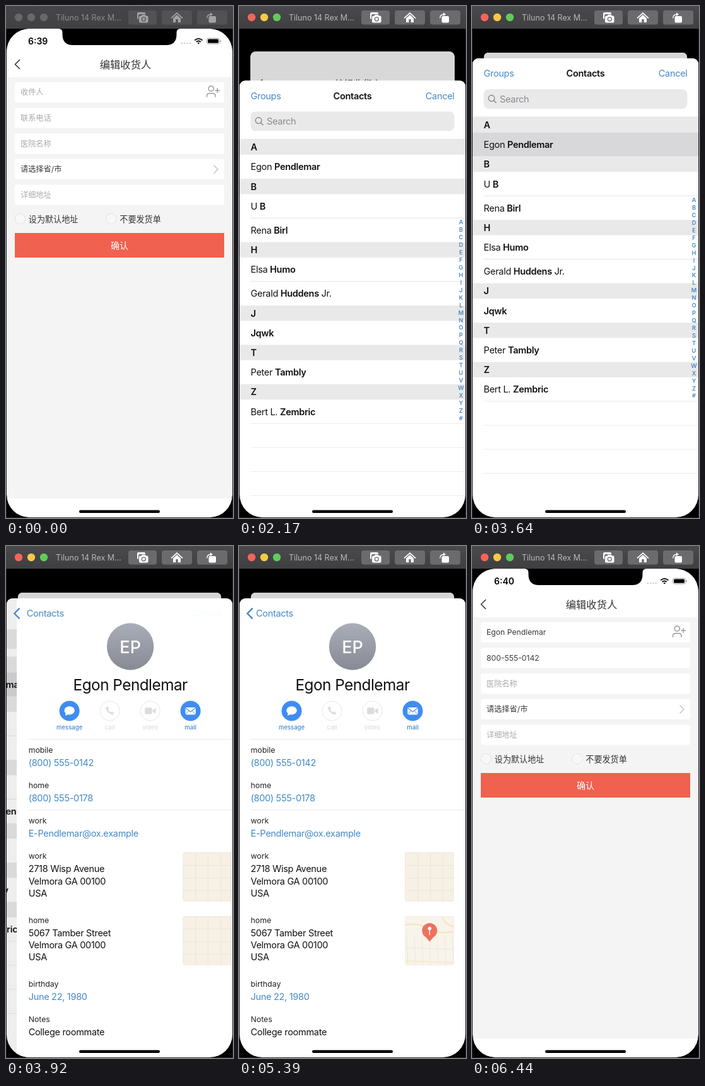
Recreate the animation shown at these times as an HTML page with a canvas. Size 360 by 812 pixels, loop 8050 ms.

```html
<!DOCTYPE html>
<html lang="zh">
<head>
<meta charset="utf-8">
<title>编辑收货人</title>
<style>
html, body { margin: 0; width: 100%; height: 100%; overflow: hidden; background: #000; }
canvas { display: block; width: 360px; height: 812px; }
</style>
</head>
<body>
<canvas id="stage"></canvas>
<script>
const W = 360, H = 812, LOOP = 8050, STEP = 70;
const LINK = '#4489c6', BLUE = '#3f8df2', INK = '#111', HAIR = '#e4e4e4';
const SHEET_TOP = 83;
const T = { active: 1680, release: 1820, present: 1908, tapRow: 3630, push: 3657,
            maps: 4270, tapPhone: 4830, dismiss: 5410 };
const PERSON = 'Egon Pendlemar', PHONE = '800-555-0142';

const canvas = document.getElementById('stage');
const ratio = window.devicePixelRatio || 1;
canvas.width = W * ratio;
canvas.height = H * ratio;
const c = canvas.getContext('2d');

const clamp = v => Math.max(0, Math.min(1, v));
const mix = (a, b, p) => a + (b - a) * p;

// Critically damped spring, from 0 to 1
function spring(ms) {
  const x = Math.max(0, ms) / 1000 * 18.26;
  return 1 - (1 + x) * Math.exp(-x);
}

function group(draw) {
  c.save();
  draw();
  c.restore();
}

// y is the middle of the capitals
function text(s, x, y, size, { color = INK, weight = 400, align = 'left', gap = 0 } = {}) {
  c.font = `${weight} ${size}px Inter, "Noto Sans CJK SC", "Noto Sans CJK", sans-serif`;
  c.letterSpacing = gap + 'px';
  c.textAlign = align;
  c.fillStyle = color;
  c.fillText(s, x, y + size * 0.364);
  return c.measureText(s).width;
}

function body(s, x, y, opts) {
  return text(s, x, y, 14.5, { gap: -0.3, ...opts });
}

function rect(x, y, w, h, color) {
  c.fillStyle = color;
  c.fillRect(x, y, w, h);
}

function roundPath(x, y, w, h, r) {
  c.beginPath();
  c.roundRect(x, y, w, h, r);
}

function round(x, y, w, h, r, color) {
  roundPath(x, y, w, h, r);
  c.fillStyle = color;
  c.fill();
}

function disc(x, y, r, color) {
  c.beginPath();
  c.arc(x, y, r, 0, 7);
  c.fillStyle = color;
  c.fill();
}

function ring(x, y, r, color, width = 1) {
  c.beginPath();
  c.arc(x, y, r, 0, 7);
  pen(color, width);
}

function pen(color, width) {
  c.strokeStyle = color;
  c.lineWidth = width;
  c.stroke();
}

function line(points, color, width) {
  c.beginPath();
  points.forEach(([x, y]) => c.lineTo(x, y));
  pen(color, width);
}

function shape(d, color) {
  c.fillStyle = color;
  c.fill(new Path2D(d));
}

function curve(d, color, width) {
  c.strokeStyle = color;
  c.lineWidth = width;
  c.stroke(new Path2D(d));
}

function titleBar(active) {
  const bar = c.createLinearGradient(0, 0, 0, 36);
  bar.addColorStop(0, active ? '#4a494b' : '#464547');
  bar.addColorStop(1, active ? '#3f3e40' : '#414042');
  rect(0, 0, W, 36, bar);
  const lights = active ? ['#f9635a', '#f6c945', '#5fcb5b'] : ['#686769', '#686769', '#686769'];
  lights.forEach((color, i) => disc(20 + 20 * i, 18, 6.2, color));
  text('Tiluno 14 Rex M...', 79, 18.5, 12.5, { color: active ? '#b8b7b9' : '#8b8a8c' });

  const back = active ? '#6b6a6c' : '#525153', ink = active ? '#fff' : '#a3a2a4';
  [[194, 45], [247, 48], [303, 48]].forEach(([x, w]) => round(x, 7, w, 22.5, 4, back));

  round(208, 10, 13, 11, 2, ink);
  round(210, 13, 16.5, 14.5, 2.5, back);
  round(211, 15.5, 14.5, 11, 2, ink);
  round(215, 13.8, 6.5, 4, 1, ink);
  ring(218.3, 20.8, 3, back, 1.3);

  line([[262, 19.3], [271, 11.2], [280, 19.3]], ink, 1.8);
  shape('M265 19.5 L271 14 L277 19.5 V26 H272.7 V21 H269.3 V26 H265 Z', ink);

  round(321.5, 16, 11.5, 10.5, 2, ink);
  curve('M318.7 19.5 Q318.7 13.5 325 13.3', ink, 1.4);
  shape('M324 10.3 L328 13.2 L324 16 Z', ink);
}

function personIcon(alpha) {
  group(() => {
    c.globalAlpha *= alpha;
    c.lineCap = 'round';
    ring(325.3, 131, 4.1, '#999', 1.5);
    curve('M318.5 144 V142.5 Q318.5 138.5 323 138.5 H327.5 Q332 138.5 332 142.5 V144', '#999', 1.5);
    line([[332, 134], [338.5, 134]], '#999', 1.4);
    line([[335.2, 130.8], [335.2, 137.2]], '#999', 1.4);
  });
}

function form(filled, iconAlpha) {
  rect(0, 36, W, 776, '#f4f4f4');
  rect(0, 36, W, 77, '#fff');
  rect(0, 781, W, 31, '#fff');
  line([[22, 85], [14.5, 92.5], [22, 100]], '#333', 1.5);
  text('编辑收货人', 189.5, 93, 16.3, { color: '#333', weight: 500, align: 'center' });

  const dark = '#3a3a3a', pale = '#aaa';
  const rows = [
    filled ? [PERSON, dark] : ['收件人', pale],
    filled ? [PHONE, dark] : ['联系电话', pale],
    ['医院名称', pale], ['请选择省/市', dark], ['详细地址', pale]
  ];
  rows.forEach(([label, color], i) => {
    const y = 121 + 40.6 * i;
    round(14, y, 332, 32, 3, '#fff');
    text(label, 23, y + 16, 12.2, { color });
  });
  personIcon(iconAlpha);
  line([[329.5, 252.5], [336, 259], [329.5, 265.5]], '#bbb', 1.2);

  [[22.5, '设为默认地址'], [167, '不要发货单']].forEach(([x, label]) => {
    disc(x, 337.5, 8.3, '#f7f7f7');
    ring(x, 337.5, 8.3, '#e2e2e2');
    text(label, x + 13.3, 338, 13.1, { color: '#333' });
  });
  rect(14, 360, 332, 39, '#f0614f');
  text('确认', 180, 380, 14, { color: '#fff', align: 'center' });
}

function statusBar(clock) {
  text(clock, 35, 56, 14, { weight: 600, color: '#000' });
  for (let i = 0; i < 4; i++) disc(278.7 + 4.3 * i, 59, 1.3, '#ccc');
  group(() => {
    c.beginPath();
    c.moveTo(305.3, 60.5);
    c.arc(305.3, 60.5, 10, -Math.PI * 0.75, -Math.PI * 0.25);
    c.clip();
    disc(305.3, 60.5, 2.6, '#000');
    ring(305.3, 60.5, 5, '#000', 1.9);
    ring(305.3, 60.5, 8.6, '#000', 1.9);
  });
  roundPath(318.5, 51.2, 20, 9, 2.6);
  pen('#999', 0.9);
  round(320, 52.6, 17, 6.2, 1.5, '#000');
  round(339.6, 54, 1.3, 3.4, 0.6, '#999');
}

function person(parts, y) {
  let x = 18.5;
  parts.forEach((part, i) => { x += body(part, x, y, { weight: i === 1 ? 600 : 400 }); });
}

const CONTACTS = [
  ['A', [['Egon ', 'Pendlemar']]],
  ['B', [['U ', 'B'], ['Rena ', 'Birl']]],
  ['H', [['Elsa ', 'Humo'], ['Gerald ', 'Huddens', ' Jr.']]],
  ['J', [['', 'Jqwk']]],
  ['T', [['Peter ', 'Tambly']]],
  ['Z', [['Bert L. ', 'Zembric']]]
];
const HEAD = 24.3, ROW = 38.1;

function list(pressed) {
  rect(0, SHEET_TOP, W, 730, '#fff');
  round(18.5, 132, 323, 31, 8, '#e9e9ea');
  ring(31, 146.3, 4.8, '#85858a', 1.3);
  line([[34.5, 149.8], [38.5, 153.8]], '#85858a', 1.5);
  body('Search', 44, 147.5, { color: '#8a8a8e' });
  rect(0, 175.7, W, 0.8, '#d6d6d6');

  let y = 176.3;
  for (const [letter, people] of CONTACTS) {
    rect(0, y, W, HEAD, '#e9e9e9');
    body(letter, 18.5, y + HEAD / 2 + 0.3, { weight: 600 });
    y += HEAD;
    people.forEach((parts, i) => {
      if (pressed && letter === 'A') rect(0, y, W, ROW, '#d8d8da');
      if (i) rect(18.5, y - 0.5, W, 1, HAIR);
      person(parts, y + ROW / 2 + 0.3);
      y += ROW;
    });
  }
  for (let i = 0; i < 4; i++) rect(18.5, y - 0.5 + ROW * i, W, 1, '#ebebeb');
  [...'ABCDEFGHIJKLMNOPQRSTUVWXYZ#'].forEach((ch, i) =>
    text(ch, 352, 307.7 + 11.94 * i, 9.2, { color: LINK, weight: 600, align: 'center' }));
}

function mapTile(y, loaded, pin) {
  group(() => {
    roundPath(263.5, y, 77.5, 77.5, 3);
    c.clip();
    rect(263, y, 79, 79, loaded && pin ? '#f8f4ec' : '#f6f0e5');
    if (loaded && pin) {
      for (let i = 0; i < 7; i++) line([[266 + 12 * i, y + 31], [268 + 12 * i, y + 78]], '#ebe5da', 0.8);
      line([[263, y + 50], [342, y + 53]], '#ece6da', 1);
      curve(`M263 ${y + 14} Q285 ${y + 10} 300 ${y + 20} T342 ${y + 24}`, '#f4e6b4', 2);
      curve(`M322 ${y} Q326 ${y + 14} 342 ${y + 17}`, '#f4e6b4', 2);
      line([[263, y + 71], [342, y + 74]], '#f4e9c3', 1.5);
      shape(`M296 ${y + 33} L302.3 ${y + 40.5} L308.6 ${y + 33} Z`, '#f0705f');
      disc(302.3, y + 23, 12, '#f0705f');
      disc(302.3, y + 19.5, 2.8, '#fff');
      rect(301.7, y + 21, 1.3, 9, '#fff');
    } else {
      for (let i = 0; i < 4; i++) {
        rect(263 + 20 * i, y, 0.8, 78, '#ebe3d4');
        rect(263, y + 20 * i, 78, 0.8, '#ebe3d4');
      }
    }
    roundPath(263.5, y, 77.5, 77.5, 3);
    pen('#ece6da', 1);
  });
}

function actions() {
  const off = '#dcdcdc';
  ['message', 'call', 'video', 'mail'].forEach((label, i) => {
    const x = 83.5 + 64 * i, on = i === 0 || i === 3;
    if (on) disc(x, 261.5, 16, BLUE);
    else ring(x, 261.5, 15.5, '#e6e6e6');
    text(label, x, 288, 9.5, { color: on ? LINK : off, weight: 500, align: 'center' });
  });
  c.beginPath();
  c.ellipse(83.5, 260.8, 8.3, 6.6, 0, 0, 7);
  c.fillStyle = '#fff';
  c.fill();
  shape('M78 264 L76.8 269.3 L83 266.5 Z', '#fff');

  curve('M143 256.5 Q143.5 264.5 152 266', off, 2.6);
  line([[142.3, 255.5], [144.3, 259.5]], off, 4);
  line([[149.5, 264.3], [153, 266.3]], off, 4);

  round(203, 256.2, 11.5, 10.6, 2.3, off);
  shape('M215.5 260 L220.5 256.7 V266.3 L215.5 263 Z', off);

  round(267.3, 256, 16.4, 11.4, 1.8, '#fff');
  line([[267.8, 257], [275.5, 263], [283.2, 257]], BLUE, 1.2);
  line([[267.8, 266.5], [273, 261.5]], BLUE, 0.9);
  line([[283.2, 266.5], [278, 261.5]], BLUE, 0.9);
}

const FIELDS = [
  [324, 'mobile', LINK, '(800) 555-0142'],
  [380, 'home', LINK, '(800) 555-0178'],
  [436, 'work', LINK, 'E-Pendlemar@ox.example'],
  [492, 'work', INK, '2718 Wisp Avenue', 'Velmora GA 00100', 'USA'],
  [593.5, 'home', INK, '5067 Tamber Street', 'Velmora GA 00100', 'USA'],
  [694.5, 'birthday', LINK, 'June 22, 1980'],
  [750.5, 'Notes', INK, 'College roommate']
];

function detail(t) {
  rect(0, SHEET_TOP, W, 730, '#fff');
  const shade = c.createLinearGradient(0, 122, 0, 197);
  shade.addColorStop(0, '#aaaeb9');
  shade.addColorStop(1, '#878a93');
  disc(180, 159.5, 37.2, shade);
  text('EP', 180, 160.5, 27, { color: '#fff', weight: 500, align: 'center' });
  text(PERSON, 180, 220, 24.3, { align: 'center', gap: -0.5 });
  actions();

  const press = t < T.tapPhone ? 0 : 1 - clamp((t - T.tapPhone - 140) / 280);
  if (press) rect(0, 306, W, 56, `rgba(209,209,214,${0.5 * press})`);
  rect(18.5, 306, W, 0.8, HAIR);
  rect(18.5, 418, W, 0.8, HAIR);
  for (const [y, label, color, ...lines] of FIELDS) {
    text(label, 18.5, y, 12.3, { color: '#222' });
    lines.forEach((s, i) => body(s, 18.5, y + 20.2 + 19.1 * i, { color }));
  }
  const loaded = t >= T.maps;
  mapTile(486, loaded, false);
  mapTile(587, loaded, true);
}

function navBar(p) {
  group(() => {
    c.globalAlpha = 1 - p;
    body('Groups', 18.5, 107, { color: LINK });
    body('Cancel', 341.5, 107, { color: LINK, align: 'right' });
    body('Contacts', 180 - 122 * p, 107, { weight: 600, align: 'center' });
    c.globalAlpha = p;
    line([[21.5, 98.7], [13.3, 107], [21.5, 115.3]], LINK, 2.4);
    body('Contacts', mix(149, 27, p), 107, { color: LINK });
  });
}

function sheet(t, up) {
  const p = spring(t - T.push), x = W * (1 - p);
  c.translate(0, 729 * (1 - up));
  roundPath(1, SHEET_TOP, 358, 740, [9, 9, 0, 0]);
  c.clip();
  if (p < 0.999) group(() => {
    c.translate(-108 * p, 0);
    list(t >= T.tapRow);
  });
  if (p > 0) {
    rect(0, SHEET_TOP, x, 730, `rgba(0,0,0,${0.07 * p})`);
    group(() => {
      c.translate(x, 0);
      detail(t);
    });
  }
  if (p < 0.9) rect(0, SHEET_TOP, W, 45, '#fff');
  navBar(p);
}

function backCard(t, up) {
  const pressed = t >= T.active && t < T.release + 140;
  c.translate(180, 36 + 38 * up);
  c.scale(1 - 0.1 * up, 1 - 0.1 * up);
  c.translate(-180, -36);
  roundPath(1, 36, 358, 775, mix(36, 8, up));
  c.clip();
  form(t >= T.dismiss, pressed ? 0.6 : 1);
  rect(0, 36, W, 776, `rgba(0,0,0,${0.16 * up})`);
}

function render(t) {
  const up = t < T.dismiss ? spring(t - T.present) : 1 - spring(t - T.dismiss);
  c.setTransform(ratio, 0, 0, ratio, 0, 0);
  rect(0, 0, W, H, '#000');
  group(() => {
    roundPath(1, 36, 358, 775, 36);
    c.clip();
    group(() => backCard(t, up));
    group(() => {
      c.globalAlpha = clamp(1 - up * 1.1);
      statusBar(t < T.dismiss ? '6:39' : '6:40');
    });
    if (up > 0.0005) group(() => sheet(t, up));
  });
  shape('M83 36 Q89.5 36 89.5 42 V45 Q89.5 62 106 62 H254 Q270.5 62 270.5 45 V42 Q270.5 36 277 36 Z', '#000');
  round(116, 799.5, 128, 4.4, 2.2, '#000');
  rect(0, 36, 0.6, 776, '#3a3a3a');
  rect(359.4, 36, 0.6, 776, '#3a3a3a');
  rect(0, 811.3, W, 0.7, '#3a3a3a');
  titleBar(t >= T.active);
}

function tick() {
  const t = performance.now() % LOOP;
  render(Math.floor(t / STEP) * STEP);
  requestAnimationFrame(tick);
}
tick();
</script>
</body>
</html>
```
